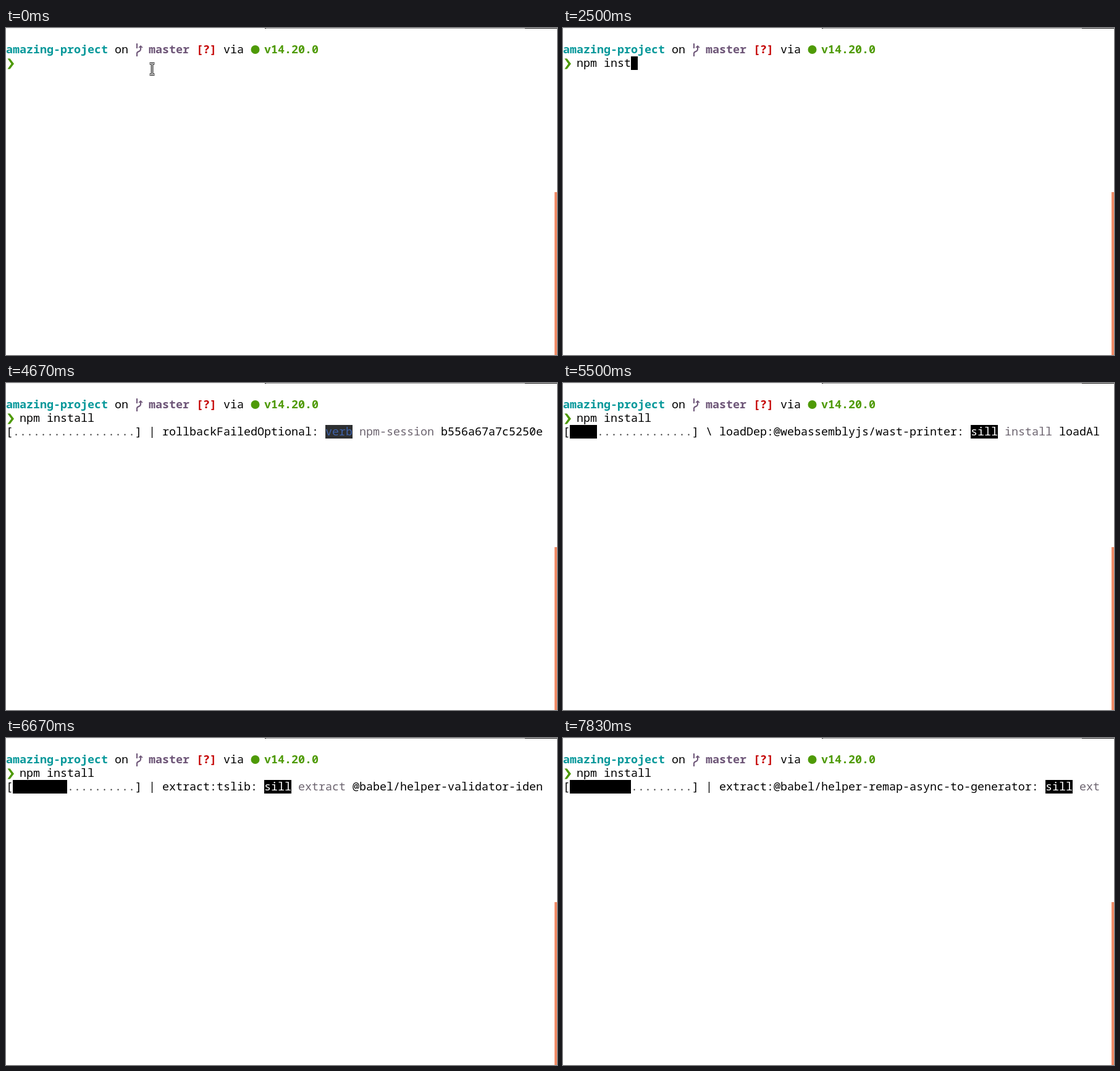
An HTML page with a canvas that plays this animation: 892x530 px, repeating every 8 s.

```html
<!DOCTYPE html>
<html lang="en">
<head>
<meta charset="utf-8">
<title>npm install in a terminal</title>
<style>
  html, body { margin: 0; width: 100%; height: 100%; overflow: hidden; background: #fff; }
  canvas { display: block; }
</style>
</head>
<body>
<canvas id="stage" width="892" height="530"></canvas>
<script>
const ctx = document.getElementById('stage').getContext('2d');
const LOOP = 8000, STEPS_PER_SECOND = 6;
const CELL = 11, LINE = 22, TOP = 24, COLUMNS = 79, BAR = 18;
const FONT = '18.333px "Noto Sans Mono", "DejaVu Sans Mono", monospace';
const INK = '#000', TEAL = '#06989a', PURPLE = '#6d5577', RED = '#c40000', GREEN = '#4e9a06';

const COMMAND = 'npm install';
const KEY_STEPS = [5, 8, 9, 10, 11, 12, 13, 14, 16, 17, 18];
const CURSOR_ON = 3, ENTER = 21;

// Start step, filled bar cells, task, log level, log prefix, log message
const MESSAGES = [
  [24, 0, 'rollbackFailedOptional', 'verb', 'npm-session', 'b556a67a7c5250e'],
  [29, 1, 'fetchMetadata', 'sill', 'resolveWithNewModule', 'tslib@1.14.1 checking installable status'],
  [32, 4, 'loadDep:@webassemblyjs/wast-printer', 'sill', 'install', 'loadAllDepsIntoIdealTree'],
  [35, 5, 'loadDep:terser-webpack-plugin', 'sill', 'install', 'loadAllDepsIntoIdealTree'],
  [38, 8, 'extract:tslib', 'sill', 'extract', 'tslib@1.14.1'],
  [40, 8, 'extract:tslib', 'sill', 'extract', '@babel/helper-validator-identifier'],
  [43, 8, 'extract:@babel/helper-module-imports', 'sill', 'extract', '@babel/helper-module-imports'],
  [45, 9, 'extract:@babel/helper-wrap-function', 'sill', 'extract', '@babel/helper-wrap-function'],
  [47, 9, 'extract:@babel/helper-remap-async-to-generator', 'sill', 'extract', '@babel/helper-remap-async'],
];

function rect(x, y, w, h, color) {
  ctx.fillStyle = color;
  ctx.fillRect(x, y, w, h);
}

function cells(row, col, count, color) {
  rect(col * CELL, TOP + row * LINE, count * CELL, LINE, color);
}

// Writes text on the cell grid and returns the column after it.
function write(row, col, text, color = INK, { bold = false, back } = {}) {
  const shown = text.slice(0, Math.max(0, COLUMNS - col));
  if (back) cells(row, col, shown.length, back);
  ctx.font = (bold ? 'bold ' : '') + FONT;
  ctx.fillStyle = color;
  ctx.fillText(shown, col * CELL, TOP + row * LINE + 17);
  return col + shown.length;
}

function stroke(path, color, width) {
  ctx.strokeStyle = color;
  ctx.lineWidth = width;
  ctx.stroke(new Path2D(path));
}

function drawWindow() {
  rect(0, 0, 892, 530, '#fff');
  rect(0, 0, 419, 1, '#eee');
  rect(419, 0, 2, 1, '#222');
  rect(421, 0, 419, 1, '#999');
  rect(840, 0, 52, 1, '#222');
  rect(888, 266, 4, 264, '#f08c68');
}

function drawPrompt() {
  const bold = { bold: true };
  write(0, 0, 'amazing-project', TEAL, bold);
  write(0, 16, 'on');
  stroke('M212 25V33M212 46V41Q212 39 215 38T218 34V30', PURPLE, 2);
  stroke('M215 32L218 29L221 32', PURPLE, 1.5);
  write(0, 21, 'master', PURPLE, bold);
  write(0, 28, '[?]', RED, bold);
  write(0, 32, 'via');
  ctx.fillStyle = GREEN;
  ctx.fill(new Path2D('M396.5 35a7 7 0 1 0 14 0a7 7 0 1 0 -14 0'));
  write(0, 38, 'v14.20.0', GREEN, bold);
  ctx.fillStyle = GREEN;
  ctx.fill(new Path2D('M2.5 49.5H6.5L13 58L6.5 66.5H2.5L8.5 58Z'));
}

function drawPointer() {
  const beam = 'M232.5 57.5H235L236.5 58.5L238 57.5H240.5M236.5 58.5V74.5M232.5 75.5H235L236.5 74.5L238 75.5H240.5';
  stroke(beam, '#000', 3.6);
  stroke(beam, '#fff', 1.4);
}

function drawProgress(step) {
  const message = MESSAGES.filter(([start]) => start <= step).pop();
  if (!message) return;
  const [start, filled, task, level, prefix, detail] = message;
  const spinner = '|/-\\'[(step - start) * 3 % 4];
  write(2, 0, '[');
  cells(2, 1, filled, INK);
  write(2, 1 + filled, '.'.repeat(BAR - filled), '#444');
  write(2, 1 + BAR, '] ' + spinner);
  let col = write(2, 23, task + ':') + 1;
  const verbose = level === 'verb';
  col = write(2, col, level, verbose ? '#3f62a8' : '#fff', { back: verbose ? '#2d2f31' : INK }) + 1;
  col = write(2, col, prefix, '#6c646f') + 1;
  write(2, col, detail);
}

function draw(now) {
  const step = Math.floor((now % LOOP + 4) * STEPS_PER_SECOND / 1000);
  const typed = KEY_STEPS.filter(key => key <= step).length;
  drawWindow();
  drawPrompt();
  write(1, 2, COMMAND.slice(0, typed));
  if (step >= CURSOR_ON && step < ENTER) cells(1, 2 + typed, 1, INK);
  if (step >= ENTER && step < MESSAGES[0][0]) cells(2, 0, 1, INK);
  if (!typed) drawPointer();
  drawProgress(step);
}

function tick() {
  draw(performance.now());
  requestAnimationFrame(tick);
}
tick();
</script>
</body>
</html>
```
